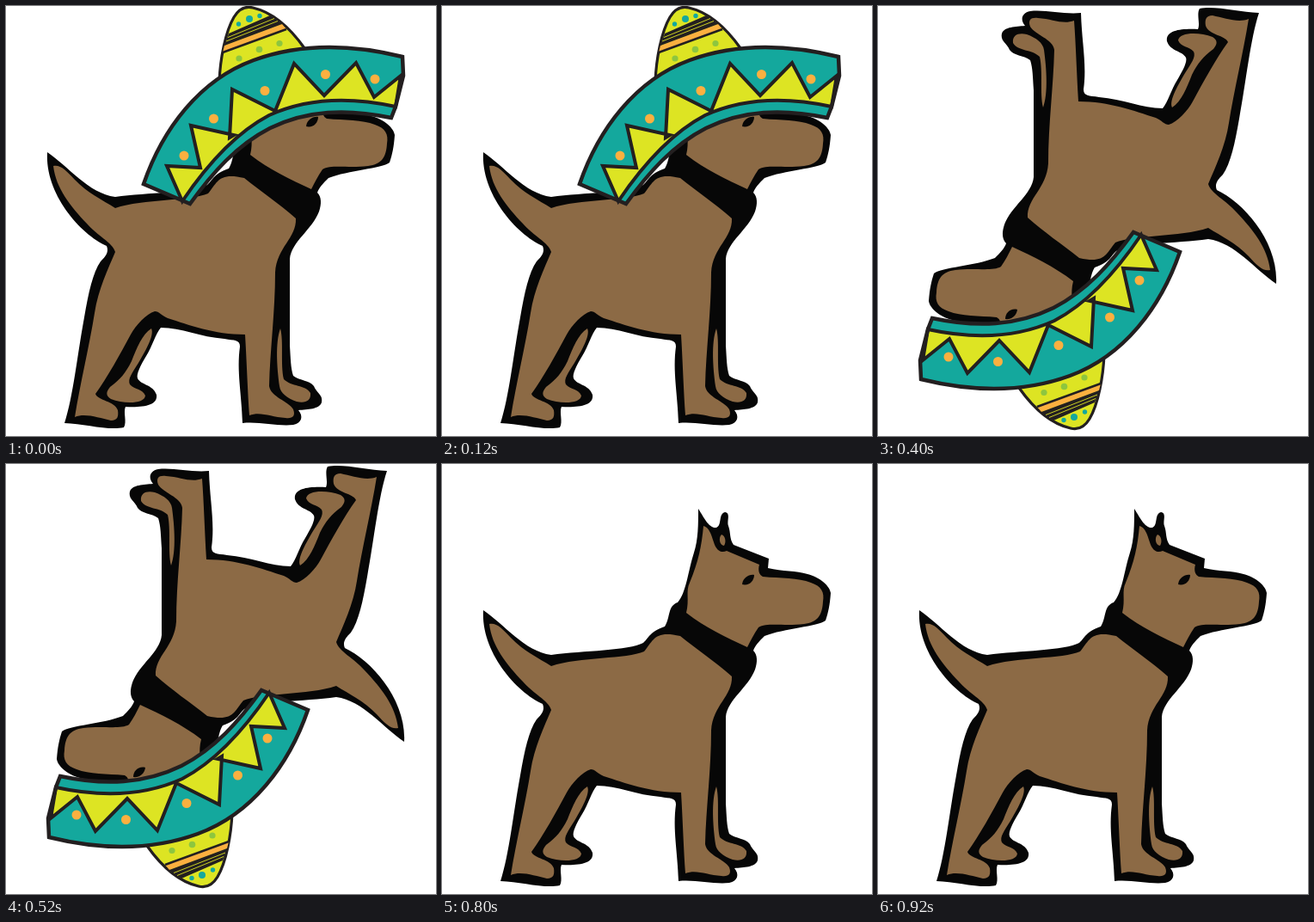
Recreate the animation shown at these times as an HTML page with a canvas. Size 500 px wide and 500 px high, loop 1000 ms.

```html
<!DOCTYPE html>
<html lang="en">
<head>
<meta charset="utf-8">
<title>Dog in a sombrero</title>
<style>
html, body { margin: 0; width: 100%; height: 100%; overflow: hidden; background: #fff; }
canvas { display: block; width: 500px; height: 500px; }
</style>
</head>
<body>
<canvas id="stage" width="500" height="500"></canvas>
<script>
const ctx = document.getElementById('stage').getContext('2d');
const BLACK = '#070707', FUR = '#8c6a45', INK = '#231f20';
const TEAL = '#14a89d', LIME = '#dde423', ORANGE = '#fbb040', GREEN = '#8dc63f';

function shape(d, fill, stroke, width) {
  const p = new Path2D(d);
  if (fill) { ctx.fillStyle = fill; ctx.fill(p); }
  if (stroke) { ctx.strokeStyle = stroke; ctx.lineWidth = width; ctx.stroke(p); }
}

function dots(color, list) {
  ctx.fillStyle = color;
  for (const [x, y, r] of list) {
    ctx.beginPath();
    ctx.arc(x, y, r, 0, Math.PI * 2);
    ctx.fill();
  }
}

function drawDog() {
  // silhouette
  shape(`M48 170C72 186 96 218 127 222C165 217 217 217 234 208C241 202 240 196 259 189
    C266 178 262 165 274 161C284 150 286 125 293 103C298 88 298 70 298 52
    C304 61 310 75 319 74C326 71 321 58 329 56C336 57 331 66 333 72C336 80 334 87 339 94
    L380 110L379 121C396 125 412 124 425 128C440 132 451 142 452 150C451 164 449 173 446 182
    C437 189 398 191 375 200C369 206 364 211 362 217C367 222 367 230 364 239
    C356 260 332 274 330 294L330 395C331 410 331 421 334 430C342 436 353 435 358 442
    C361 450 369 452 367 461C364 469 351 469 340 470C346 477 344 485 334 487
    C316 489 295 483 275 485C274 450 268 425 272 396C272 388 266 389 254 387
    C226 385 204 374 180 374C174 381 170 396 163 407C157 417 151 428 153 433
    C157 441 171 440 175 452C177 465 158 467 139 466C136 472 141 484 137 490
    C120 494 92 486 68 485C78 455 83 405 91 362C96 333 101 310 110 297
    C116 291 120 286 117 279C86 265 45 218 48 170Z`, BLACK);
  // near legs, body and tail
  shape(`M55 186C63 184 70 191 80 202C94 217 113 226 127 235C160 224 215 227 235 218
    C246 205 247 193 277 200C297 216 318 230 337 247C338 270 315 280 313 310
    C313 355 307 400 306 442C308 455 328 459 334 469C337 477 333 480 325 479
    C308 478 296 471 283 476C281 450 280 415 278 382C242 382 213 371 188 363
    C181 360 178 355 173 355C163 358 151 371 145 382C133 404 118 432 104 451
    C107 459 126 459 130 470C131 477 130 482 122 482C108 479 92 473 80 478
    C86 440 97 395 103 357C107 330 119 305 127 286C124 275 106 267 94 253
    C75 233 58 212 55 186Z`, FUR);
  // far hind leg
  shape(`M169 375C173 383 161 403 154 415C147 426 141 434 144 440C149 446 159 445 162 453
    C161 463 137 463 122 457C116 453 116 449 121 443C133 434 139 427 146 413
    C152 398 158 382 169 375Z`, FUR);
  // far front leg
  shape(`M319 375C323 390 319 417 323 434C332 443 348 440 354 450C355 460 347 462 338 460
    C327 456 319 450 318 442C315 420 313 392 319 375Z`, FUR);
  // head
  shape(`M304 72C311 74 313 82 316 91C319 101 325 104 331 101L369 117C367 124 369 129 373 131
    C394 133 414 132 429 138C441 142 445 149 443 160C442 176 437 184 421 186
    C399 189 378 184 368 190C363 197 359 205 355 213C331 202 306 190 284 173
    C288 158 283 148 288 138C298 114 302 95 304 72Z`, FUR);
  shape('M325 82C329 83 331 90 328 95C323 95 321 86 325 82Z', FUR);
  // eye
  shape('M349 140C350 132 357 128 363 129C363 136 357 142 349 140Z', BLACK);
}

function drawHat() {
  // crown
  shape('M248 88C249 62 255 30 265 13C271 3 279 0 287 2C309 7 330 25 347 49L330 80Z', LIME, INK, 3.2);
  shape('M252 54L326 27L321 21L254 46Z', ORANGE);
  shape('M252 54L326 27', null, INK, 2.6);
  shape('M254 46L259 32L307 11L321 21Z', INK);
  shape('M256 41L316 17.5M258 36.5L312 14.5', null, LIME, 0.9);
  dots(TEAL, [[270.5, 21, 2.7], [283, 15, 4], [295, 11.5, 2.7]]);
  dots(GREEN, [[271, 61, 3.6], [294.5, 50.5, 3.8], [318, 43.5, 3.6]]);

  // brim
  const brim = `M160 207C182 143 225 86 288 63C340 44 400 44 461 59L462 81L453 117
    L448 130C396 119 350 121 307 142C268 162 240 194 214 230Z`;
  shape(brim, TEAL);
  const edge = 'C398 105 350 107 306 127C266 148 232 187 205 227';
  shape(`M205 227L187 186L226 188L215 139L265 150L260 153L263 97L313 122L335 67L370 104L407 66
    L428 106L459 81L453 117${edge}Z`, LIME, INK, 4);
  shape(brim, null, INK, 4.5);
  dots(ORANGE, [[207, 174, 5.5], [241.5, 131, 5.5], [301, 98.5, 5.5], [371.5, 79.5, 5.5], [429, 85, 5.5]]);
}

// quarter turns with the hat on, then a bare-headed pose
const POSES = [
  { m: [1, 0, 0, 1, 0, 0], hat: true },
  { m: [0, 1, -1, 0, 496, -9], hat: true },
  { m: [-1, 0, 0, -1, 511, 493], hat: true },
  { m: [0, -1, 1, 0, 3, 502], hat: true },
  { m: [1, 0, 0, 1, 0, 0], hat: false }
];
const STEP = 200;

function draw(t) {
  const pose = POSES[Math.floor(t / STEP) % POSES.length];
  ctx.setTransform(1, 0, 0, 1, 0, 0);
  ctx.fillStyle = '#fff';
  ctx.fillRect(0, 0, 500, 500);
  ctx.setTransform(...pose.m);
  drawDog();
  if (pose.hat) drawHat();
}

const start = performance.now();
function tick() {
  draw(performance.now() - start);
  requestAnimationFrame(tick);
}
tick();
</script>
</body>
</html>
```
